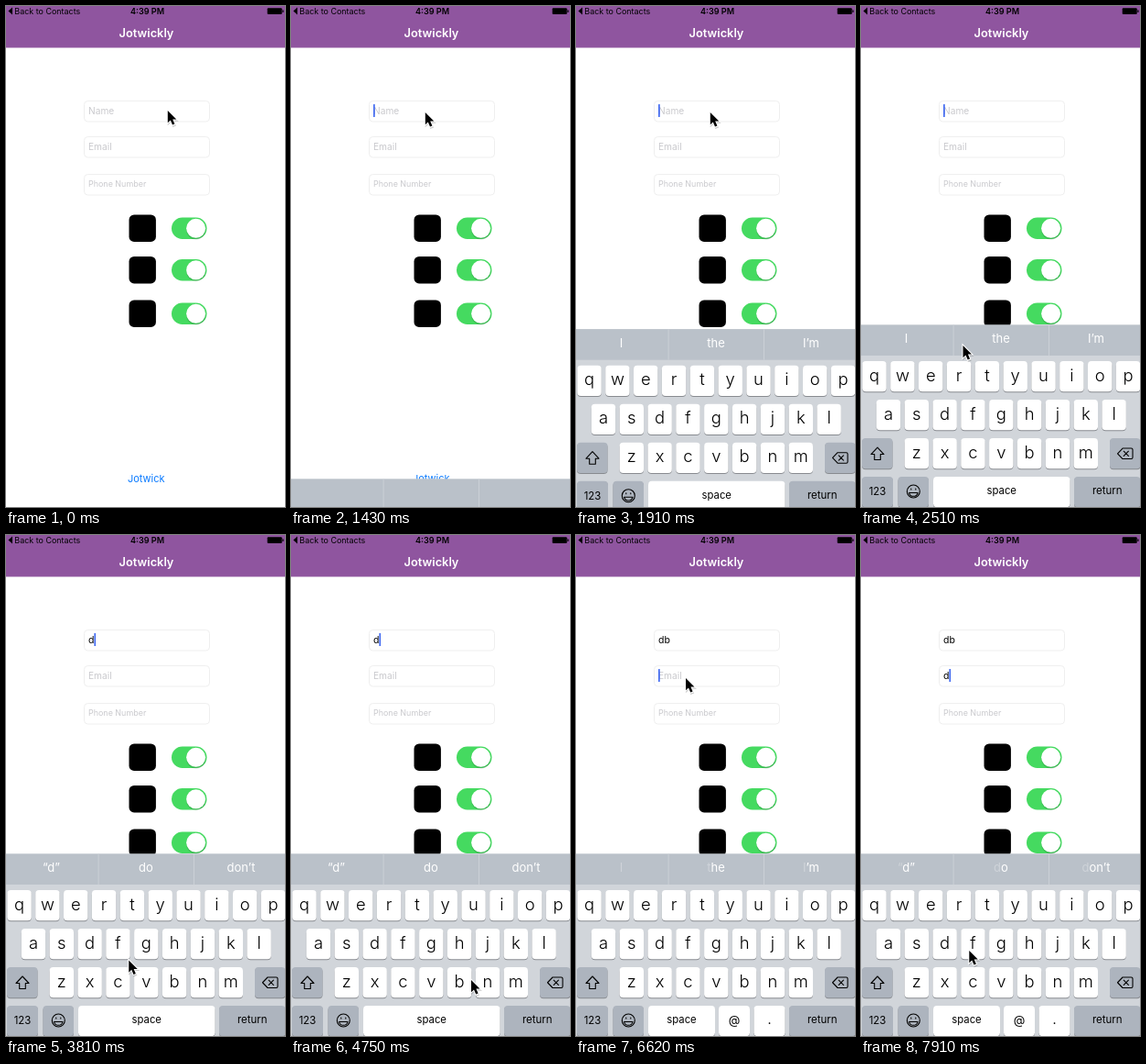
Write an HTML page that moves like this. It is 305 px wide and 546 px high and loops after 8000 ms.

```html
<!DOCTYPE html>
<html lang="en">
<head>
<meta charset="utf-8">
<title>Contact form</title>
<style>
  html, body { margin: 0; width: 100%; height: 100%; overflow: hidden; background: #fff; }
  svg { display: block; width: 100vw; height: 100vh; }
  text { font-family: Inter, "Liberation Sans", sans-serif; white-space: pre; }
</style>
</head>
<body>
<svg id="stage" viewBox="0 0 305 546"></svg>
<script>
const LOOP = 8000, TICKS = 68, BOARD_TOP = 347.5, BOARD_HEIGHT = 199;
const stage = document.getElementById('stage');

function el(parent, tag, attrs) {
  const node = document.createElementNS('http://www.w3.org/2000/svg', tag);
  for (const name in attrs) node.setAttribute(name, attrs[name]);
  return parent.appendChild(node);
}
const group = parent => el(parent, 'g');
const rect = (parent, x, y, width, height, fill, rx = 0, more) =>
  el(parent, 'rect', { x, y, width, height, fill, rx, ...more });
const path = (parent, d, more) => el(parent, 'path', { d, ...more });
function label(parent, x, y, size, content, fill, anchor = 'start', weight = 400) {
  const node = el(parent, 'text', {
    x, y, fill, 'font-size': size, 'text-anchor': anchor, 'font-weight': weight
  });
  node.textContent = content;
  return node;
}

// Status and title bars
rect(stage, 0, 0, 305, 45.5, '#8f559f');
path(stage, 'M7 1.5V9.5L2.5 5.5Z', { fill: '#000' });
label(stage, 9.3, 8.8, 8.95, 'Back to Contacts', '#000');
label(stage, 154.5, 9, 9.1, '4:39 PM', '#000', 'middle', 600);
rect(stage, 285.7, 2.3, 16, 6.6, '#000', 1);
rect(stage, 302.3, 4.2, 1.2, 2.8, '#000', 0.6);
label(stage, 153.5, 34, 12.8, 'Jotwickly', '#fff', 'middle', 600);

// Form
function field(y, hint, size, baseline) {
  rect(stage, 85.5, y + 0.5, 137, 22.5, '#fff', 4, { stroke: '#efefef', 'stroke-width': 1 });
  return {
    hint: label(stage, 90, baseline, size, hint, '#c9c9cd'),
    value: label(stage, 90, baseline, 10.5, '', '#000'),
    caretY: y + 4
  };
}
const nameField = field(103, 'Name', 10.2, 118);
const emailField = field(142, 'Email', 10.2, 157);
field(183, 'Phone Number', 8.95, 197);
const caret = rect(stage, 90, 107, 1.7, 14, '#426bf2', 0.5);

for (const y of [242, 287.5, 335]) {
  rect(stage, 134.5, y - 14.5, 29.4, 29.4, '#000', 5.5);
  rect(stage, 181, y - 11.5, 38.5, 23.5, '#45da60', 11.75);
  el(stage, 'circle', { cx: 207.8, cy: y + 2, r: 10.6, fill: '#000', opacity: 0.14 });
  el(stage, 'circle', { cx: 207.6, cy: y + 0.3, r: 10.5, fill: '#fff' });
}
label(stage, 153.3, 518.6, 11, 'Jotwick', '#0a7aff', 'middle');

// Keyboard, drawn in its resting place
const board = group(stage);
rect(board, 0, BOARD_TOP, 305, BOARD_HEIGHT + 1, '#d1d5da');
rect(board, 0, BOARD_TOP, 305, 33.5, '#bac1c9');
for (const x of [100.6, 205]) rect(board, x, BOARD_TOP, 1, 33.5, '#cbd0d6');
const hints = [49.5, 153, 257].map(x => label(board, x, 367.3, 13, '', '#fff', 'middle'));

function key(parent, x, y, width, dark) {
  rect(parent, x, y + 1, width, 33.3, '#888b90', 4);
  rect(parent, x, y, width, 33.2, dark ? '#adb4be' : '#fff', 4);
}
function textKey(parent, x, y, width, content, size, baseline, dark, weight) {
  key(parent, x, y, width, dark);
  label(parent, x + width / 2, baseline, size, content, '#000', 'middle', weight);
}
['qwertyuiop', 'asdfghjkl', 'zxcvbnm'].forEach((letters, row) => {
  const y = 387 + row * 42;
  [...letters].forEach((ch, i) => {
    const middle = 153.3 + (i - (letters.length - 1) / 2) * 30.83;
    textKey(board, middle - 13.2, y, 26.4, ch, 18.4, y + 21.8, false, 300);
  });
});
const ink = { fill: 'none', stroke: '#000', 'stroke-width': 1.1, 'stroke-linejoin': 'round', 'stroke-linecap': 'round' };
key(board, 1, 471, 33.5, true);
path(board, 'M18 481L25 488.5H21.3V494.5H14.7V488.5H11Z', ink);
key(board, 272, 471, 33.5, true);
path(board, 'M286 482H295.5Q297 482 297 483.5V492Q297 493.5 295.5 493.5H286L280.5 487.75ZM287.2 485.2L292.4 490.4M292.4 485.2L287.2 490.4', ink);
textKey(board, 1, 513, 34, '123', 11.4, 533, true);
key(board, 40.5, 513, 33.5, true);
el(board, 'circle', { cx: 57.3, cy: 529, r: 7, ...ink });
path(board, 'M52.6 530.5H62Q61.2 534.3 57.3 534.3T52.6 530.5ZM54.8 526V527M59.8 526V527', ink);
textKey(board, 233, 513, 72.5, 'return', 11.5, 532.3, true);

const plainRow = group(board);
textKey(plainRow, 79, 513, 149.5, 'space', 11.3, 532.3);
const mailRow = group(board);
textKey(mailRow, 79, 513, 73, 'space', 11.3, 532.3);
textKey(mailRow, 156, 513, 34, '@', 13, 532.8);
textKey(mailRow, 194.5, 513, 34, '.', 14, 532.8);

const pointer = group(stage);
const arrow = 'M0 0V13.2L3 10.4L5.2 15.6L7.6 14.6L5.4 9.5H9.5Z';
path(pointer, arrow, { opacity: 0.2, transform: 'translate(.6 1.4)', stroke: '#000', 'stroke-width': 1.5 });
path(pointer, arrow, { stroke: '#fff', 'stroke-width': 2, 'paint-order': 'stroke' });

// Pointer legs: first tick, last tick, end point
const home = [176.8, 114];
const legs = [
  [0, 3, 146.8, 116], [18, 21, 111.5, 370], [22, 25, 87, 439], [29, 33, 143, 468],
  [36, 40, 197, 485], [40, 42, 188, 484.5], [43, 46, 121.8, 201], [46, 49, 124, 174],
  [50, 52, 120, 156], [56, 61, 95, 482], [61, 64, 86, 451], [66, 67, 118.3, 453]
];

// Taps and key presses
const FOCUS = 12;
const opening = ['I', 'the', 'I’m'], afterD = ['“d”', 'do', 'don’t'];
const events = [
  { tick: 0, name: '', email: '', words: opening },
  { tick: FOCUS, name: '', email: '', words: opening },
  { tick: 29, name: 'd', email: '', words: afterD },
  { tick: 43, name: 'db', email: '', words: ['“db”', 'even', 'ebony'] },
  { tick: 55, name: 'db', email: '', words: opening, onEmail: true },
  { tick: 66, name: 'db', email: 'd', words: afterD, onEmail: true }
];

const clamp = v => Math.min(1, Math.max(0, v));
const smooth = v => v * v * (3 - 2 * v);

function pointerAt(tick) {
  let [x, y] = home;
  for (const [from, to, endX, endY] of legs) {
    const k = smooth(clamp((tick - from) / (to - from)));
    x += (endX - x) * k;
    y += (endY - y) * k;
  }
  return [x, y];
}

// Critically damped spring
function riseAt(tick) {
  if (tick < FOCUS) return 0;
  const x = 0.7 + 1.235 * (tick - FOCUS);
  return 1 - (1 + x) * Math.exp(-x);
}

// Solid just after an event, then blinking every 8 ticks
const blink = age => clamp(0.6 + 1.1 * Math.cos((Math.max(age, 3) - 2.5) * Math.PI / 4));

function showHints(words, fading) {
  hints.forEach((node, i) => {
    node.textContent = '';
    [...words[i]].forEach((ch, j) => {
      const alpha = fading && j === 0 ? 0.3 : 1;
      el(node, 'tspan', { 'fill-opacity': alpha }).textContent = ch;
    });
  });
}

function fill(target, value) {
  target.value.textContent = value;
  target.hint.setAttribute('opacity', value ? 0 : 1);
}

function draw(tick) {
  const index = events.findLastIndex(e => e.tick <= tick);
  const { name, email, words, onEmail, tick: since } = events[index];
  const age = tick - since;

  pointer.setAttribute('transform', `translate(${pointerAt(tick)})`);

  const rise = riseAt(tick);
  board.setAttribute('transform', `translate(0 ${(1 - rise) * BOARD_HEIGHT})`);
  for (const node of hints) node.setAttribute('opacity', clamp(rise * 1.5 - 0.3));
  const previous = events[Math.max(0, index - 1)].words;
  showHints(age ? words : previous, age === 1 && words !== previous);

  fill(nameField, name);
  fill(emailField, email);
  plainRow.setAttribute('visibility', onEmail ? 'hidden' : 'visible');
  mailRow.setAttribute('visibility', onEmail ? 'visible' : 'hidden');

  caret.setAttribute('x', 90 + (onEmail ? email : name).length * 6.4);
  caret.setAttribute('y', (onEmail ? emailField : nameField).caretY);
  caret.setAttribute('opacity', tick < FOCUS ? 0 : blink(age));
}

const begin = performance.now();
let drawn;
function run() {
  const tick = Math.floor((performance.now() - begin) % LOOP / LOOP * TICKS);
  if (tick !== drawn) draw(drawn = tick);
  requestAnimationFrame(run);
}
run();
</script>
</body>
</html>
```
